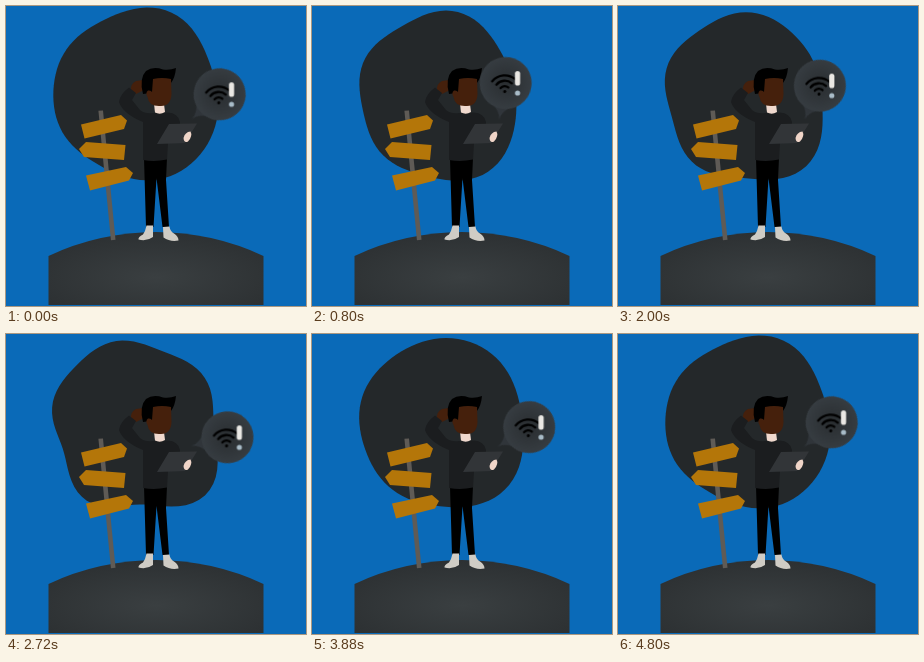
Write an HTML page that moves like this. It is 300x300 px and loops after 4840 ms.

```html
<!DOCTYPE html>
<html lang="en">
<head>
<meta charset="utf-8">
<title>Lost connection</title>
<style>
  html, body { margin: 0; width: 100%; height: 100%; overflow: hidden; background: #0a6ab8; }
  svg { display: block; width: 100%; height: 100%; }
  .swing, .level { animation: swing 4840ms ease infinite; }
  .level { animation-name: level; }
  @keyframes swing {
    0%, 100% { transform: rotate(48.5deg); }
    35% { transform: rotate(-1deg); }
    66% { transform: rotate(82deg); }
  }
  @keyframes level {
    0%, 100% { transform: rotate(-48.5deg); }
    35% { transform: rotate(1deg); }
    66% { transform: rotate(-82deg); }
  }
</style>
</head>
<body>
<svg viewBox="0 0 300 300">
  <defs>
    <radialGradient id="soil" cx="0.5" cy="0.62" r="0.6">
      <stop offset="0" stop-color="#3a3f41"/>
      <stop offset="1" stop-color="#2d3133"/>
    </radialGradient>
    <radialGradient id="glass">
      <stop offset="0" stop-color="#292d30"/>
      <stop offset="1" stop-color="#363c41"/>
    </radialGradient>
  </defs>

  <path id="blob" fill="#24282a"/>
  <path fill="url(#soil)" d="M42.5 299V250A253 253 0 0 1 257.5 250V299Z"/>

  <g id="signpost">
    <path stroke="#5f5b56" stroke-width="4.6" d="M94.7 104.6 107.2 234"/>
    <g fill="#b47609">
      <path d="M75 118.5 115 109 121 114.5 118 123 78.5 132.5Z"/>
      <path d="M73 143 80 136 119.5 139 118 154 78 151Z"/>
      <path d="M80 169.500 120 161 127 167 123 174.500 84 184.500Z"/>
    </g>
  </g>

  <g id="person">
    <path d="M138 152H161L160 174 163 221H156.500L150.500 172 147.500 221H140Z"/>
    <g fill="#cfccc5">
      <path d="M140.500 219.500H147V231Q140 236 132.500 233.500 132 231 137 228.500 139.500 225 140.500 219.500Z"/>
      <path d="M157 221 163.500 220.500Q164 225 168 227.500 172.500 230.500 172.500 234.500 164 236 157.500 231.500Z"/>
    </g>
    <path fill="#45200c" d="M125 85Q124 78 130 75L137 74 138 84 130 88Z"/>
    <path fill="#1b1d1f" d="M147 107Q139 108 134 104L126 94 130 87 123 81.500Q114 88 113 96 117 108 137 116L137 154Q149 156 161 153.500L162 137H172L174 116Q172 107 162 106.500Z"/>
    <path fill="#f0d9ce" d="M148 98H158L159 106Q154 109 149 106.500Z"/>
    <path d="M137 88Q133 72 140 65 147 60 157 63.500 164 64.500 170 62 169 72 165 77L145 87Z"/>
    <path fill="#45200c" d="M147 73Q156 71 165 73L165.500 88Q165 100 155 100 143 101 141.500 91 139 87 142 84.500 145 84 146 86Z"/>
    <path fill="#323538" d="M163 118 191 117.500 179 137 151 138Z"/>
    <path fill="#f0d5c8" d="M177.500 132Q179 126 184.500 125.500 187 130 182 135.500 178 137.500 177.500 132Z"/>
  </g>

  <g id="bubble" transform="translate(187.5 111.5)">
    <g class="swing">
      <path fill="#30353a" d="M0 2Q-1 -7 -10 -12H10Q1 -7 0 2Z"/>
      <g transform="translate(0 -35)">
        <circle r="26" fill="url(#glass)"/>
        <g class="level">
          <g transform="translate(-1 8.5) rotate(-5)">
            <circle r="1.5"/>
            <path id="waves" fill="none" stroke="#000" stroke-width="2.3" stroke-linecap="round"/>
          </g>
          <rect x="9.2" y="-12" width="5.2" height="14.6" rx="2.6" fill="#eae8e4"/>
          <circle cx="11.8" cy="10" r="2.6" fill="#a9bcc8"/>
        </g>
      </g>
    </g>
  </g>
</svg>
<script>
  const byId = id => document.getElementById(id);

  byId('waves').setAttribute('d', [1, 2, 3].map(i => {
    const r = 5.4 * i, x = r * Math.sin(0.8), y = -r * Math.cos(0.8);
    return `M${-x} ${y}A${r} ${r} 0 0 1 ${x} ${y}`;
  }).join(''));

  // A circle whose radius wobbles: waves[k] holds the cosine and sine parts of k + 1 ripples per turn.
  function blobPath(radius, waves, steps = 90) {
    const points = Array.from({ length: steps }, (_, i) => {
      const a = i / steps * 2 * Math.PI;
      const r = waves.reduce((sum, [c, s], k) =>
        sum + c * Math.cos((k + 1) * a) + s * Math.sin((k + 1) * a), radius);
      return `${(125 + r * Math.cos(a)).toFixed(2)} ${(90 + r * Math.sin(a)).toFixed(2)}`;
    });
    return `M${points.join('L')}Z`;
  }

  const round = blobPath(83.7, [[6.6, -1.5], [-1.1, 1], [-3, 1], [-0.4, 0.7], [0.9, 0.5]]);
  const narrow = blobPath(80.8, [[1.2, 2.3], [-3.4, 2.9], [-2.3, 1.3], [-0.9, 1.2], [1.2, -1.8]]);
  const lumpy = blobPath(84.5, [[6, 3.3], [-0.8, 3.8], [0.3, 1.3], [-3.5, 1.4], [-3.3, -3]]);

  const pose = (offset, shape) => ({ offset, d: `path("${shape}")`, easing: 'ease' });
  byId('blob').setAttribute('d', round);
  byId('blob').animate(
    [pose(0, round), pose(0.35, narrow), pose(0.66, lumpy), pose(1, round)],
    { duration: 4840, iterations: Infinity }
  );
</script>
</body>
</html>
```
